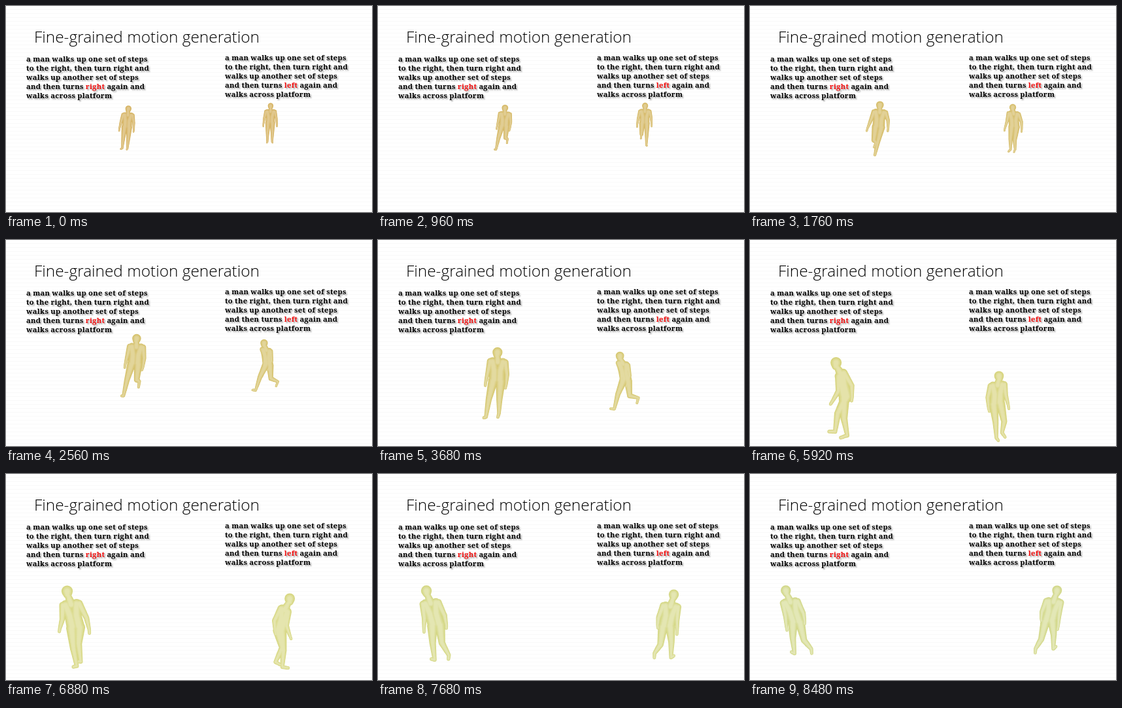
An HTML page with a canvas for the animation above (8.64 s loop, 560 by 315 pixels).

```html
<!DOCTYPE html>
<html lang="en">
<head>
<meta charset="utf-8">
<title>Fine-grained motion generation</title>
<style>
html, body { margin: 0; width: 560px; height: 315px; overflow: hidden; }
body { position: relative; background: repeating-linear-gradient(#fff 0 5px, #f9f9f9 5px 6px); }
h1, p, canvas { position: absolute; margin: 0; white-space: pre; }
h1 { left: 43px; top: 30px; font: 300 24.4px/33px "Open Sans", sans-serif; color: #000; }
p { font: bold 11.2px/14px "Noto Serif", serif; letter-spacing: .27px; color: #000; text-shadow: 2px 2px 2px #aaa; }
b { color: #f00c0c; }
canvas { left: 0; top: 0; }
</style>
</head>
<body>
<h1>Fine-grained motion generation</h1>
<p style="left:31px;top:74px">a man walks up one set of steps
to the right, then turn right and
walks up another set of steps
and then turns <b>right</b> again and
walks across platform</p>
<p style="left:335px;top:72px">a man walks up one set of steps
to the right, then turn right and
walks up another set of steps
and then turns <b>left</b> again and
walks across platform</p>
<canvas width="560" height="315"></canvas>
<script>
const ctx = document.querySelector('canvas').getContext('2d');
const LOOP = 8.64, STEP = 0.16, TILT = 0.25;
const { sin, cos, min, max, PI } = Math;

const mix = (a, b, u) => a + (b - a) * u;
const ramp = (from, to, t) => {
  const u = min(1, max(0, (t - from) / (to - from)));
  return u * u * (3 - 2 * u);
};

// path points: seconds, head x, head y, body height; heading in degrees, 0 faces the viewer
const walkers = [
  {
    path: [[0, 188, 152, 67], [1, 195, 151, 70], [2.4, 203, 141, 95],
      [4.6, 169, 181, 119], [5.9, 131, 179, 122], [6.9, 91, 170, 124], [8.5, 52, 170, 110]],
    heading: t => -15 - 140 * ramp(4.7, 6.7, t),
    gait: t => .33 + .47 * t + .043 * t * t,
    center: 150
  },
  {
    path: [[0, 405, 148, 61], [1, 409, 148, 66], [2.6, 394, 152, 82],
      [4.6, 348, 187, 99], [5.9, 380, 201, 105], [6.9, 437, 182, 114], [8.5, 472, 170, 107]],
    heading: t => -45 * ramp(1, 2.6, t) + 205 * ramp(4.7, 7.8, t),
    gait: t => -.42 + .815 * t + .018 * t * t,
    center: 395
  }
];

function along(path, t) {
  const i = path.findIndex(p => p[0] > t), a = path[i - 1], b = path[i];
  return a.map((v, j) => mix(v, b[j], (t - a[0]) / (b[0] - a[0])));
}

// Body points are [side, up, forward, radius] in units of body height.
const trunk = [
  ...[-1, 1].map(s => [[s * .075, .78, 0, .06], [s * .045, .65, .015, .065], [s * .045, .52, 0, .07]]),
  [[0, .78, 0, .06], [0, .87, .02, .04]],
  [[0, .885, .035, .05], [0, .93, .015, .07]]
];

function leg(s, phase, walk) {
  const thigh = walk * (.18 + .38 * sin(phase));
  const shin = thigh - walk * (.35 + .85 * max(0, cos(phase + .6)));
  const kneeUp = .5 - .25 * cos(thigh), kneeFwd = .25 * sin(thigh);
  const up = kneeUp - .23 * cos(shin), fwd = kneeFwd + .23 * sin(shin);
  return [[s * .055, .5, 0, .068], [s * .06, kneeUp, kneeFwd, .044],
    [s * .06, up, fwd, .026], [s * .07, up + .08 * sin(shin), fwd + .08 * cos(shin), .022]];
}

function arm(s, phase, walk) {
  const upper = -.35 * walk * sin(phase) - .05, lower = upper + .15 + .25 * walk;
  const up = .78 - .17 * cos(upper), fwd = .17 * sin(upper);
  return [[s * .11, .78, 0, .046], [s * .15, up, fwd, .034],
    [s * .17, up - .15 * cos(lower), fwd + .15 * sin(lower), .022],
    [s * .17, up - .2 * cos(lower), fwd + .2 * sin(lower), .02]];
}

function drawWalker({ path, heading, gait, center }, t) {
  const [, x, y, h] = along(path, t);
  const angle = heading(t) * PI / 180, walk = ramp(0, .9, t);
  // Perspective leans the body toward the middle; the hips trail the head and feet.
  const lean = (center - x) / 400;
  const project = ([side, up, fwd, r]) => {
    const down = 1 - up, f = fwd - .11 * walk * sin(PI * down);
    const across = side * cos(angle) + f * sin(angle);
    const toward = f * cos(angle) - side * sin(angle);
    return [x + h * (lean * down + across), y + h * (down + TILT * toward), r * h];
  };
  const limbs = [-1, 1].flatMap(s => {
    const phase = 2 * PI * gait(t) + (s < 0 ? PI : 0);
    return [leg(s, phase, walk), arm(s, phase, walk)];
  });
  const chains = [...trunk, ...limbs].map(chain => chain.map(project));
  const u = t / LOOP;
  for (let k = 0; k < 5; k++) {
    ctx.fillStyle = `hsl(${42 + 23 * u} ${58 - 8 * u}% ${60 + 9 * u + 3 * k}%)`;
    ctx.beginPath();
    chains.forEach(chain => addChain(chain, 1 - .15 * k));
    ctx.fill();
  }
}

// Rounded tube through the points, as overlapping discs
function addChain(points, scale) {
  for (let i = 1; i < points.length; i++) {
    for (let u = 0; u <= 1; u += 1 / 16) {
      const [x, y, r] = points[i - 1].map((v, j) => mix(v, points[i][j], u));
      ctx.moveTo(x + r * scale, y);
      ctx.arc(x, y, r * scale, 0, 2 * PI);
    }
  }
}

function frame() {
  const t = Math.floor(performance.now() / 1000 % LOOP / STEP) * STEP;
  ctx.clearRect(0, 0, 560, 315);
  walkers.forEach(walker => drawWalker(walker, t));
  requestAnimationFrame(frame);
}
frame();
</script>
</body>
</html>
```
